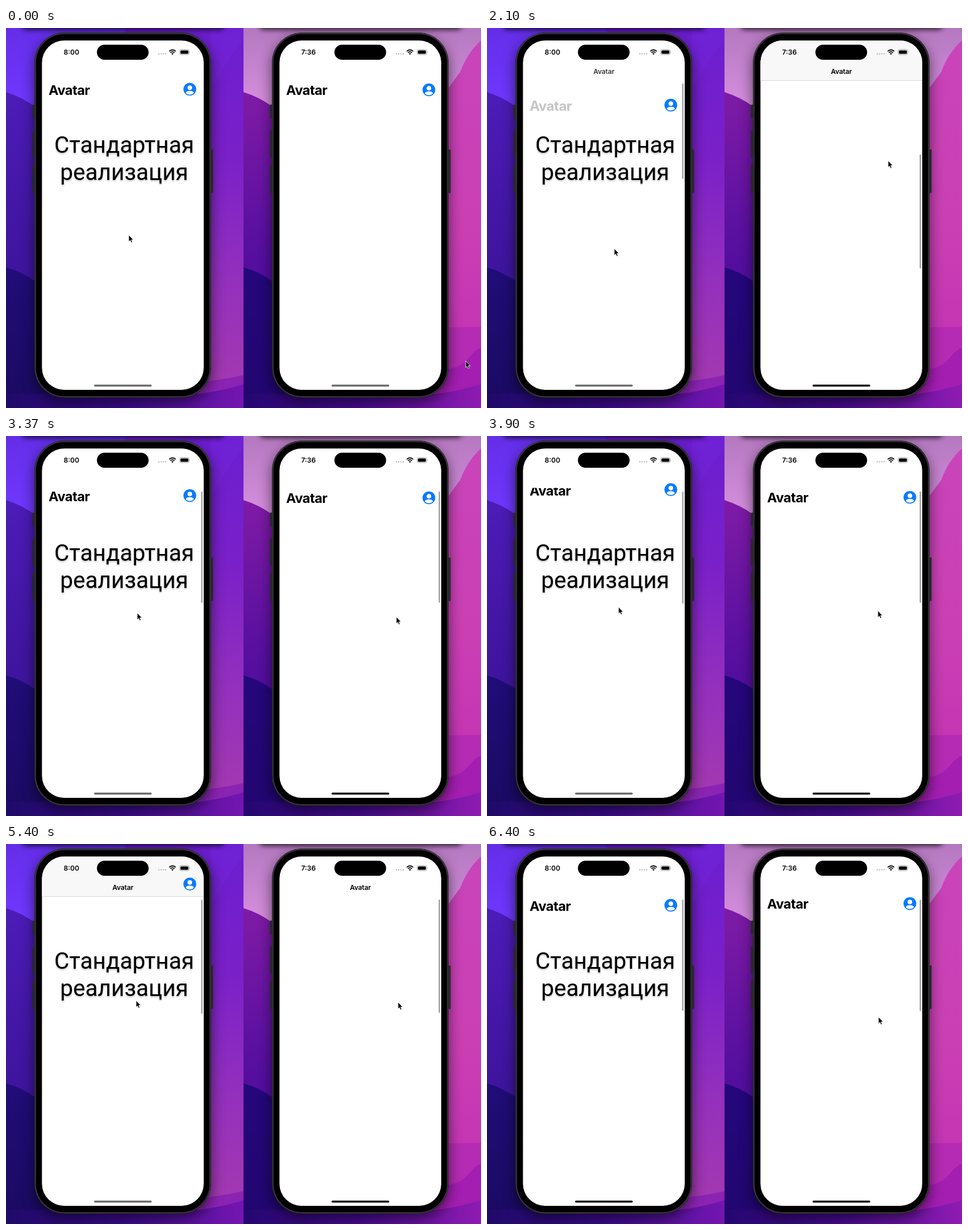
Write an HTML page that moves like this. It is 836 by 670 pixels and loops after 6.47 s.

```html
<!DOCTYPE html>
<html lang="ru">
<head>
<meta charset="utf-8">
<style>
html, body { margin: 0; width: 100%; height: 100%; overflow: hidden; background: #41109b; }
svg { display: block; }
text { font-family: Inter, "Liberation Sans", sans-serif; }
.heading text { font: 400 40.6px Roboto, sans-serif; text-anchor: middle; text-shadow: 0 2px 3px rgba(0,0,0,.25); }
.large { font-weight: 700; font-size: 23.5px; letter-spacing: -.5px; }
.small { font-weight: 600; font-size: 12px; letter-spacing: -.15px; text-anchor: middle; }
.clock { font-weight: 600; font-size: 12px; }
</style>
</head>
<body>
<svg id="stage" width="836" height="670" viewBox="0 0 836 670"></svg>
<script>
const LOOP = 6470, HALF = 418;
const stage = document.getElementById('stage');

// Evenly spaced colours, top to bottom or left to right
const gradient = (id, colors, across) =>
  `<linearGradient id="${id}" x2="${+!!across}" y2="${+!across}">` +
  colors.map((c, i) => `<stop offset="${i / (colors.length - 1)}" stop-color="${c}"/>`).join('') + '</linearGradient>';

const palettes = {
  L: { sky: ['#642ee8', '#7038ff'], hill: ['#4c1cb8', '#40159f', '#37129c'], deep: ['#200d78', '#1b0a62'],
       edge: ['#6b1ed0', '#7a20c9', '#9430bd', '#a63aae'], floor: ['#1f0a68', '#3a0b8c', '#7416b0'] },
  R: { sky: ['#b478bf', '#d68fde'], hill: ['#7f1ba6', '#560f9f', '#43089c'], deep: ['#25077c', '#22066f'],
       edge: ['#c944ba', '#cb3fb4', '#bf2fb2'], floor: ['#24076f', '#480b93', '#8f1bb2'] }
};

const gradients = side => Object.entries(palettes[side])
  .map(([name, colors]) => gradient(name + side, colors, name === 'floor')).join('');

const defs = `<defs>
  ${gradients('L')}${gradients('R')}
  <clipPath id="half"><rect width="${HALF}" height="670"/></clipPath>
  <clipPath id="screen"><rect x="63.3" y="22" width="284.7" height="616" rx="39"/></clipPath>
  <clipPath id="content"><rect x="63" y="91.5" width="285" height="547"/></clipPath>
  <filter id="blur" x="-30%" y="-100%" width="160%" height="300%"><feGaussianBlur stdDeviation="5"/></filter>
  <filter id="glow" x="-20%" y="-20%" width="140%" height="140%"><feGaussianBlur stdDeviation="12"/></filter>
  <g id="person">
    <circle r="11.2" fill="#087aff"/>
    <circle cy="-2.8" r="4" fill="#fff"/>
    <path d="M-7.2 6.2C-5.5 1.6 5.5 1.6 7.2 6.2A9.5 9.5 0 0 1-7.2 6.2Z" fill="#fff"/>
  </g>
  <path id="arrow" d="M-1-1V10.8L1.6 8.4 3.4 12.4 5.4 11.5 3.7 7.6H7.2Z" stroke="#fff" stroke-width=".8"/>
</defs>`;

const scenery = {
  L: `<path d="M361 0H418V22Q395 45 361 110Z" fill="#7428dd" opacity=".3"/>
      <path d="M209 640Q380 622 418 612V670H209Z" fill="#7c17b4" opacity=".6"/>`,
  R: `<path d="M418 22Q395 42 381 78L350 120V670H418Z" fill="url(#edgeR)"/>
      <path d="M209 530L418 527V670H209Z" fill="#b52bb3"/>
      <path d="M209 600H340Q375 606 395 583T418 566V670H209Z" fill="#a41eb2"/>`
};

const wallpaper = side => `
  <rect width="209" height="140" fill="url(#sky${side})"/>
  <path d="M0 113Q28 122 50 138L209 250V670H0Z" fill="url(#hill${side})"/>
  <path d="M0 422Q28 430 50 446L209 540V670H0Z" fill="url(#deep${side})"/>
  <rect x="209" width="209" height="${side === 'L' ? 670 : 140}" fill="url(#${side === 'L' ? 'edgeL' : 'skyR'})"/>
  ${scenery[side]}
  <path d="M0 645H340Q380 640 418 628V670H0Z" fill="url(#floor${side})"/>
  <rect x="28" y="-14" width="356" height="17" rx="8" filter="url(#blur)" opacity=".75"/>`;

const button = (x, y, h) => `<rect x="${x}" y="${y}" width="4.5" height="${h}" rx="1.5" fill="#29272f"/>`;

const status = time => `
  <text class="clock" x="101.5" y="47">${time}</text>
  <rect x="160" y="29.5" width="91" height="26.5" rx="13.25"/>
  ${[0, 1, 2, 3].map(i => `<circle cx="${269 + i * 4}" cy="45.5" r="1.2" fill="#bbb"/>`).join('')}
  <path d="M287.3 41.2Q293 35.8 298.7 41.2M289.4 43.6Q293 40.2 296.6 43.6" fill="none" stroke="#000" stroke-width="1.8"/>
  <path d="M291 45.1Q293 43.5 295 45.1L293 47.2Z"/>
  <rect x="305.5" y="38" width="17" height="9" rx="2.8" fill="none" stroke="#999" stroke-width=".9"/>
  <rect x="307" y="39.5" width="14" height="6" rx="1.6"/>
  <path d="M323.5 41Q325 42.5 323.5 44Z" fill="#888"/>`;

const icon = '<use class="icon" href="#person"/>';

const phone = (side, x, time) => `<g id="${side}" transform="translate(${x})" clip-path="url(#half)">
  ${wallpaper(side)}
  <rect x="50" y="18" width="311" height="642" rx="52" filter="url(#glow)" opacity=".55"/>
  ${button(46.5, 135, 24)}${button(46.5, 181, 48)}${button(46.5, 241, 50)}${button(360, 214, 77)}
  <rect x="50.5" y="8.5" width="310" height="643" rx="52" stroke="#2b2a2e"/>
  <rect x="52" y="10" width="307" height="640" rx="50.5" fill="none" stroke="#404043" stroke-width="1.5"/>
  <g clip-path="url(#screen)">
    <rect x="63" y="22" width="285" height="616" fill="#fff"/>
    <g clip-path="url(#content)">
      <text class="large">Avatar</text>
      ${side === 'R' ? icon : ''}
    </g>
    <g class="bar"><rect x="63" y="22" width="285" height="70.5" fill="#f8f8f8"/><rect x="63" y="92" width="285" height="1" fill="#d9d9d9"/></g>
    <text class="small" x="205.7" y="80.5">Avatar</text>
    ${side === 'L' ? icon : ''}
    ${status(time)}
    <rect class="scroller" x="343.4" width="2.6" rx="1.3" fill="#a5a5a5"/>
    <rect class="home" x="155" y="628.8" width="101.5" height="3.4" rx="1.7"/>
  </g>
</g>`;

stage.innerHTML = defs + phone('L', 0, '8:00') + phone('R', HALF, '7:36') +
  '<use id="cursorL" href="#arrow"/><use id="cursorR" href="#arrow"/>' +
  '<g class="heading"><text x="208" y="219.5">Стандартная</text><text x="208" y="268">реализация</text></g>';

const clamp = v => Math.max(0, Math.min(1, v));
const ramp = (t, from, to) => { const u = clamp((t - from) / (to - from)); return u * u * (3 - 2 * u); };

// Eased path through points of [time, x, y]
function follow(points, t) {
  let [, x, y] = points[0];
  for (let i = 1; i < points.length; i++) {
    const [t0, x0, y0] = points[i - 1], [t1, x1, y1] = points[i], e = ramp(t, t0, t1);
    x += (x1 - x0) * e;
    y += (y1 - y0) * e;
  }
  return [x, y];
}

// The page follows the pointer; pulling down past the top starts after a little slack
const drag = (grabY, y) => grabY > y ? grabY - y : Math.min(0, grabY - y + 5);
const SECOND_GRAB = 2600;

const phones = {
  L: {
    path: [[0, 217, 366], [1070, 221, 330], [1600, 224, 300], [2100, 225, 390], [3370, 232, 313], [4470, 233, 291],
      [5400, 230, 277], [6400, 232, 262]],
    scroll: (t, y) => t < SECOND_GRAB
      ? drag(357, y) * ramp(t, 300, 900) * (1 - ramp(t, 2150, SECOND_GRAB))
      : Math.max(0, 316 - y) * (1 - ramp(t, 5650, 6200)),
    lag: t => ramp(t, 1200, 1400) * (1 - ramp(t, 2040, 2240)),
    icon: s => [323.5, Math.max(70.5, 108 - s)],
    homeAt: 5900
  },
  R: {
    path: [[0, 810, 588], [600, 700, 395], [1070, 701, 333], [2100, 707, 235], [2700, 708, 390], [3370, 688, 320],
      [4470, 690, 297], [5400, 691, 280], [6400, 690, 306]],
    scroll: (t, y) => t < SECOND_GRAB
      ? 385 * ramp(t, 800, 1975) * (1 - ramp(t, 2200, SECOND_GRAB))
      : Math.max(0, 310 - y) - 32 * Math.sin(Math.PI * clamp((t - SECOND_GRAB) / 450)),
    lag: () => 0,
    icon: s => [326.3, 109 - s],
    homeAt: 400
  }
};

function draw(side, t) {
  const model = phones[side], root = document.getElementById(side);
  const set = (name, attrs) => {
    const el = root.querySelector('.' + name);
    for (const key in attrs) el.setAttribute(key, attrs[key]);
  };
  const [x, y] = follow(model.path, t);
  const s = model.scroll(t, y);
  const mini = Math.max(model.lag(t), clamp((s - 27) / 2));
  const pull = Math.max(0, -s);
  const deep = Math.max(0, s - 38) * .36;
  const top = 98 + deep;
  const bottom = 294 + deep + Math.max(0, Math.min(s, 38)) * .13 - pull;

  document.getElementById('cursor' + side).setAttribute('transform', `translate(${x} ${y})`);
  set('large', { transform: `translate(75 ${118 - s}) scale(${1 + pull * .0009})`, opacity: 1 - mini });
  set('small', { opacity: mini });
  set('bar', { opacity: clamp((s - 36) / 3) });
  set('icon', { transform: `translate(${model.icon(s)})` });
  set('scroller', { y: top, height: bottom - top, opacity: ramp(t, 450, 650) });
  set('home', { fill: t < model.homeAt ? '#6b6b6b' : '#000' });
}

function tick() {
  const t = performance.now() % LOOP;
  draw('L', t);
  draw('R', t);
  requestAnimationFrame(tick);
}
tick();
</script>
</body>
</html>
```
